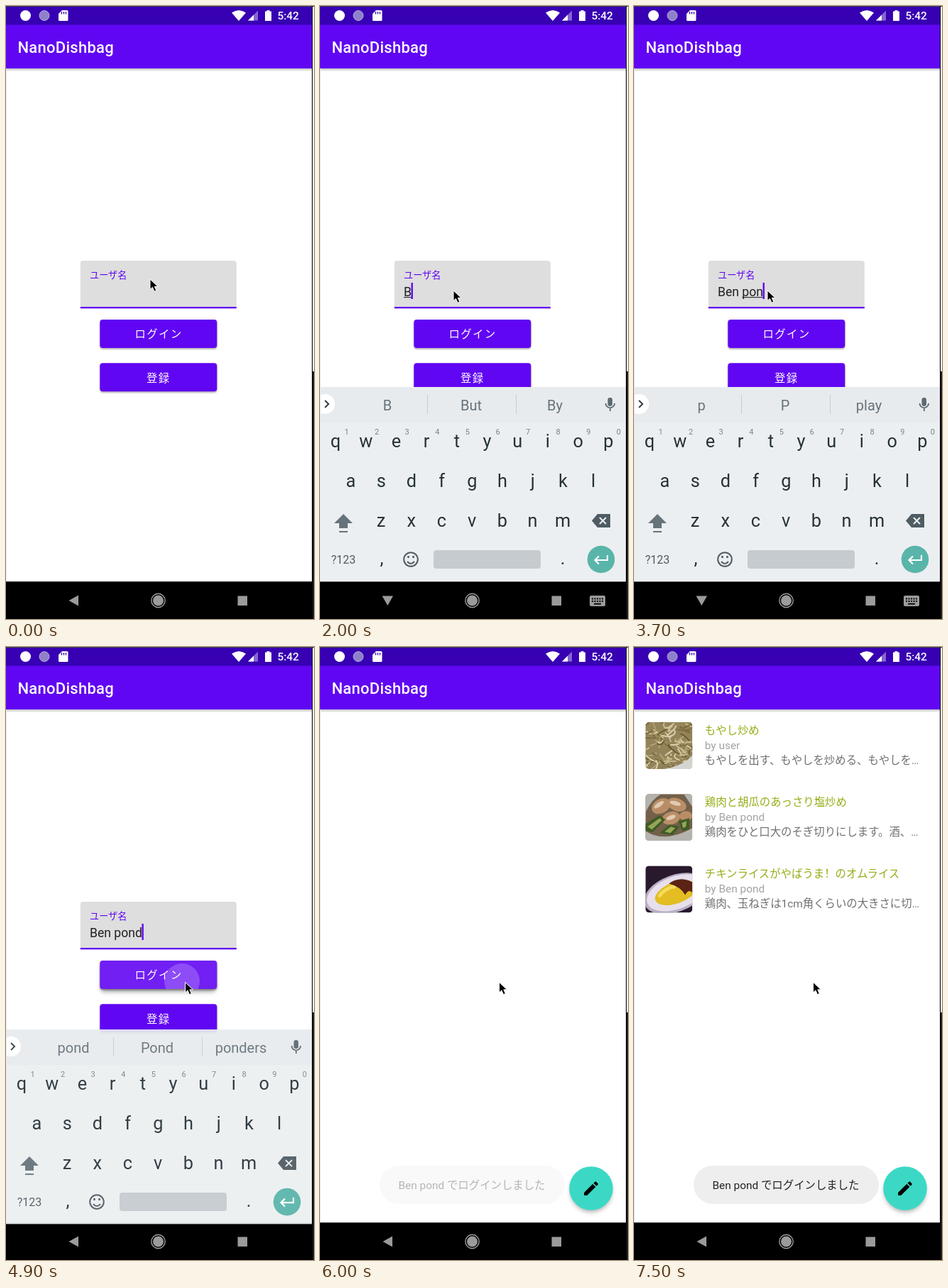
These frames come from a looping animation (434x864 px, 7600 ms). An HTML page:

```html
<!DOCTYPE html>
<html lang="ja">
<head>
<meta charset="utf-8">
<title>Login demo</title>
<style>
html, body { margin: 0; width: 100%; height: 100%; overflow: hidden; background: #fff; }
svg { display: block; width: 434px; height: 864px; font-family: Roboto, 'Noto Sans CJK SC', 'Noto Sans CJK JP', sans-serif; }
text { white-space: pre; }
.mid { text-anchor: middle; }
.btn { font-size: 15.4px; letter-spacing: 1.37px; fill: #fff; }
.row { font-size: 15.4px; }
.key { font-size: 25.3px; fill: #263238; text-anchor: middle; }
.num { font-size: 11px; fill: #78838a; text-anchor: middle; }
.sug { font-size: 20px; fill: #66737a; text-anchor: middle; }
</style>
</head>
<body>
<svg viewBox="0 0 434 864" lang="zh-Hans">
  <defs>
    <filter id="soft" x="-30%" y="-30%" width="160%" height="180%"><feGaussianBlur stdDeviation="1"/></filter>
    <filter id="wide" x="-30%" y="-40%" width="160%" height="200%"><feGaussianBlur stdDeviation="3"/></filter>
    <linearGradient id="fall" x2="0" y2="1">
      <stop stop-color="#000" stop-opacity=".24"/><stop offset="1" stop-color="#000" stop-opacity="0"/>
    </linearGradient>
    <clipPath id="login"><rect x="132.300" y="442" width="165" height="40" rx="4"/></clipPath>
    <clipPath id="thumb"><rect width="66" height="66" rx="5"/></clipPath>
  </defs>
  <rect width="434" height="864" fill="#fff"/>

  <g id="form">
    <path d="M104.800 426V363a4 4 0 0 1 4-4H320.800a4 4 0 0 1 4 4V426Z" fill="#dedede"/>
    <rect x="104.800" y="424" width="220" height="2.300" fill="#6106f2"/>
    <text x="118" y="384.300" font-size="13.2" fill="#6106f2">ユーザ名</text>
    <text id="name" x="118" y="408.500" font-size="17.6" fill="#212121"></text>
    <rect id="under" x="118" y="410" height="1.200" fill="#333"/>
    <rect id="caret" y="390" width="2.400" height="23" fill="#6106f2"/>
    <rect id="lift" x="134" y="447" width="161" height="39" rx="4" fill="#000" opacity=".3" filter="url(#wide)"/>
    <g id="buttons"></g>
    <g id="ripple" clip-path="url(#login)" fill="#fff">
      <rect x="132" y="442" width="166" height="40" opacity=".1"/>
      <circle id="wave" cx="248" cy="471" opacity=".2"/>
    </g>
    <text class="btn" x="181.500" y="468">ログイン</text>
    <text class="btn" x="198" y="529.500">登録</text>
  </g>

  <g id="list">
    <g id="rows"></g>
    <g id="pics">
      <g transform="translate(16.200 106)" clip-path="url(#thumb)">
        <rect width="66" height="66" fill="#93835a"/>
        <g id="sprouts" fill="none" stroke-width="1.800"></g>
        <path d="M26 66Q52 62 66 47V66Z" fill="#d4d5d0"/>
        <path d="M18 63Q48 60 66 44" fill="none" stroke="#8f8057" stroke-width="3"/>
      </g>
      <g transform="translate(16.200 207.200)" clip-path="url(#thumb)">
        <rect width="66" height="66" fill="#72604a"/>
        <path d="M0 0H22Q8 8 0 26ZM54 0H66V18ZM0 52Q26 70 66 48V66H0Z" fill="#b4b3ae"/>
        <g fill="#b98e67">
          <ellipse cx="22" cy="17" rx="14" ry="10" transform="rotate(-30 22 17)"/>
          <ellipse cx="44" cy="15" rx="14" ry="9" transform="rotate(20 44 15)"/>
          <ellipse cx="36" cy="34" rx="13" ry="9" transform="rotate(-15 36 34)"/>
          <ellipse cx="57" cy="31" rx="9" ry="7"/>
        </g>
        <g fill="#e0cbb2">
          <ellipse cx="19" cy="15" rx="8" ry="3" transform="rotate(-35 19 15)"/>
          <ellipse cx="42" cy="13" rx="8" ry="3" transform="rotate(15 42 13)"/>
          <ellipse cx="36" cy="33" rx="7" ry="3" transform="rotate(-20 36 33)"/>
        </g>
        <path d="M0 42L20 30 28 36 10 54 0 52ZM20 55L34 43 48 46 38 58ZM46 38L62 34 62 50 52 52Z" fill="#3f5b25"/>
        <path d="M3 46L20 34 23 37 9 50ZM27 53L36 46 42 48 35 55ZM51 41L58 38 57 46 53 48Z" fill="#94a758"/>
      </g>
      <g transform="translate(16.200 308.400)" clip-path="url(#thumb)">
        <rect width="66" height="66" fill="#28192d"/>
        <ellipse cx="42" cy="39" rx="46" ry="26" transform="rotate(-20 42 39)" fill="#b9adc5"/>
        <ellipse cx="43" cy="38" rx="43" ry="23" transform="rotate(-20 43 38)" fill="#e7e0ec"/>
        <ellipse cx="43" cy="38" rx="31" ry="15" transform="rotate(-20 43 38)" fill="#e3bd22"/>
        <path d="M20 42Q27 32 41 29" fill="none" stroke="#f4dc5a" stroke-width="5" stroke-linecap="round"/>
        <path d="M33 25Q48 14 66 23V38Q61 32 56 41 49 29 33 25Z" fill="#5a2315"/>
      </g>
    </g>
    <circle cx="382" cy="767" r="29.500" fill="#000" opacity=".3" filter="url(#wide)"/>
    <circle cx="382" cy="763" r="30.800" fill="#3bd9c5"/>
    <path transform="translate(368.800 750) scale(1.1)" d="M3 17.200V21H6.800L17.800 9.900 14.100 6.200ZM20.700 7Q21.300 6.300 20.700 5.600L18.400 3.300Q17.700 2.700 17 3.300L15.100 5.100 18.900 8.900Z"/>
    <g id="toast">
      <rect x="84" y="731" width="261" height="54" rx="27" fill="#eee"/>
      <text class="row mid" x="214" y="764" fill="#222">Ben pond でログインしました</text>
    </g>
  </g>

  <rect y="88" width="432" height="4.500" fill="url(#fall)"/>
  <rect y="26" width="432" height="62" fill="#6106f2"/>
  <rect width="432" height="26.500" fill="#3700b3"/>
  <text x="16.400" y="66" font-size="22" font-weight="500" letter-spacing=".27" fill="#fff">NanoDishbag</text>
  <g fill="#fff">
    <circle cx="27.500" cy="13.500" r="7.500"/>
    <circle cx="54" cy="13.500" r="7" fill="#8f80c9" stroke="#b5a9dd"/>
    <path d="M79 6H86a1.500 1.500 0 0 1 1.500 1.500V19.500a1.500 1.500 0 0 1-1.500 1.500H75.500a1.500 1.500 0 0 1-1.500-1.500V11Z"/>
    <path d="M78.500 8v3.500M81.500 8v3.500M84.500 8v3.500" stroke="#3700b3" stroke-width="1.300"/>
    <path d="M318 9.500Q328 2.500 338 9.500L328 21Z"/>
    <path d="M341 20.500L355 6.500V20.500Z" opacity=".4"/>
    <path d="M341 20.500L349 12.500V20.500Z"/>
    <path d="M365 7.500H367.500V6H371.500V7.500H374V21H365Z"/>
    <text x="382.500" y="19.300" font-size="15.4" font-weight="500">5:42</text>
  </g>

  <rect y="811.200" width="432" height="53"/>
  <g id="board">
    <rect y="537" width="432" height="274.200" fill="#eceff1"/>
    <rect y="537" width="432" height="50" fill="#e8ebee"/>
    <circle cx="7" cy="561" r="14" fill="#fff"/>
    <path d="M7 556L12 561 7 566" fill="none" stroke="#333e44" stroke-width="2"/>
    <path d="M151.500 548V575M276.500 548V575" stroke="#c7ccd0"/>
    <g id="sugs"></g>
    <rect x="405.500" y="552" width="6.500" height="12" rx="3.200" fill="#5c6a71"/>
    <path d="M402.500 560a6.300 6.300 0 0 0 12.600 0M408.800 566.500V571" fill="none" stroke="#5c6a71" stroke-width="1.800"/>
    <g id="keys"></g>
    <path d="M33 716L46 729H39V736H27V729H20Z" fill="#66737a"/>
    <path d="M27 741H39" stroke="#66737a" stroke-width="2"/>
    <path d="M391 716H409V735H391L383 725.500Z" fill="#4f5c63"/>
    <path d="M394 721L403 730M403 721L394 730" stroke="#eceff1" stroke-width="2"/>
    <text class="mid" x="33" y="786" font-size="16" fill="#4f5c63">?123</text>
    <g fill="none" stroke="#4f5c63" stroke-width="2">
      <circle cx="128" cy="780" r="9.800"/>
      <path d="M123 783Q128 789 133 783"/>
      <path d="M124.500 775V778M131.500 775V778" stroke-width="2.500"/>
    </g>
    <rect x="160" y="767" width="151" height="26" rx="4" fill="#c6cbd0"/>
    <circle cx="396" cy="780" r="19.300" fill="#59b5aa"/>
    <path d="M405 774V781H388M393 775.500L387.500 781 393 786.500" fill="none" stroke="#fff" stroke-width="2.200"/>
  </g>
  <g fill="#9b9b9b">
    <path id="back" d="M88.500 838L102 830.500V845.500Z"/>
    <path id="down" d="M87.500 831.500H103L95.300 845Z"/>
    <circle cx="214.500" cy="838" r="7.500"/>
    <circle cx="214.500" cy="838" r="9.700" fill="none" stroke="#9b9b9b" stroke-width="1.400"/>
    <rect x="326.500" y="831.500" width="13.500" height="13.500"/>
    <g id="ime">
      <rect x="380" y="831" width="22" height="15" rx="2"/>
      <path d="M383 835.500H399M383 839H399" stroke="#000" stroke-width="1.800" stroke-dasharray="2 1.500"/>
      <path d="M386 842.700H396" stroke="#000" stroke-width="1.800"/>
    </g>
  </g>
  <path d="M0 .5H434" stroke="#444"/>
  <path d="M.5 88V811" stroke="#ececec"/>
  <rect x="431" width="1.300" height="864"/>
  <rect x="432.300" y="1" width="2" height="514" fill="#fff"/>
  <rect x="432" y="515" width="2" height="349" fill="#1c1c1c"/>
  <path id="mouse" d="M0 0V14.500L3.400 11.400 6 17.300 8.800 16 6.300 10.400H11Z" stroke="#fff" stroke-width="1"/>
</svg>
<script>
const LOOP = 7600, STEP = 100;
const $ = id => document.getElementById(id);
const clamp = v => Math.max(0, Math.min(1, v));
const ease = v => v * v * (3 - 2 * v);
const show = (id, on) => { $(id).style.display = on ? '' : 'none'; };

function add(parent, tag, attrs, content = '') {
  const el = document.createElementNS('http://www.w3.org/2000/svg', tag);
  for (const k in attrs) el.setAttribute(k, attrs[k]);
  el.textContent = content;
  $(parent).append(el);
  return el;
}

const typed = [
  [0, ''], [1900, 'B'], [2100, 'Be'], [2300, 'Ben'], [2700, 'Ben '],
  [3200, 'Ben p'], [3700, 'Ben pon'], [3800, 'Ben pond']
];
const hints = [
  [0, ['', '', '']], [1900, ['B', 'But', 'By']], [2100, ['Be', 'Bed', 'Best']],
  [2300, ['Ben', 'Bend', 'Bean']], [2700, ['is', 'and', 'was']],
  [3200, ['p', 'P', 'play']], [4000, ['pond', 'Pond', 'ponders']]
];
const path = [[0, 203, 385], [200, 203, 385], [900, 188, 401], [4200, 188, 401], [4600, 252.5, 472.5], [LOOP, 252.5, 472.5]];
const at = (steps, t) => steps.filter(s => s[0] <= t).pop();

// Static parts
for (const y of [442, 503.2]) {
  const box = { x: 132.3, width: 165, height: 40, rx: 4 };
  add('buttons', 'rect', { ...box, y: y + 1.8, opacity: .32, filter: 'url(#soft)' });
  add('buttons', 'rect', { ...box, y, fill: '#6106f2' });
}

const recipes = [
  ['もやし炒め', 'user', 'もやしを出す、もやしを炒める、もやしを…'],
  ['鶏肉と胡瓜のあっさり塩炒め', 'Ben pond', '鶏肉をひと口大のそぎ切りにします。酒、…'],
  ['チキンライスがやばうま！のオムライス', 'Ben pond', '鶏肉、玉ねぎは1cm角くらいの大きさに切…']
];
recipes.forEach(([title, who, text], i) => {
  [[title, '#94ae17'], ['by ' + who, '#a2a2a2'], [text, '#707070']].forEach(([s, fill], j) =>
    add('rows', 'text', { class: 'row', x: 99.8, y: 122.5 + 101.2 * i + 21.2 * j, fill }, s));
});

let seed = 7;
const rnd = n => (seed = seed * 16807 % 2147483647) / 2147483647 * n;
const tones = ['#cdbf92', '#b5a472', '#7d6b3e', '#ddd2ad', '#9c8b58', '#675a32'];
for (let i = 0; i < 110; i++) {
  const x = rnd(76) - 5, y = rnd(66) - 5;
  add('sprouts', 'path', {
    d: `M${x} ${y}q${rnd(14) - 7} ${rnd(8)} ${rnd(36) - 18} ${rnd(20) - 4}`,
    stroke: tones[i % tones.length]
  });
}

const letters = [];
const key = (x, y, s) => add('keys', 'text', { class: 'key', x, y }, s);
[['qwertyuiop', 22, 622], ['asdfghjkl', 43.5, 678], ['zxcvbnm', 86, 734]].forEach(([row, x, y]) =>
  [...row].forEach((c, i) => letters.push([key(x + 42.7 * i, y, c), c])));
for (let i = 0; i < 10; i++) add('keys', 'text', { class: 'num', x: 37.5 + 42.6 * i, y: 604 }, (i + 1) % 10);
key(87, 787, ',');
key(342, 787, '.');
const sugs = [95, 213, 331].map(x => add('sugs', 'text', { class: 'sug', x, y: 569.5 }));

function moveMouse(t) {
  const i = Math.max(1, path.findIndex(p => p[0] > t));
  const [a, b] = [path[i - 1], path[i]];
  const p = ease(clamp((t - a[0]) / (b[0] - a[0])));
  const mix = k => a[k] + (b[k] - a[k]) * p;
  $('mouse').setAttribute('transform', `translate(${mix(1)} ${mix(2)})`);
}

function drawField(t) {
  const [since, text] = at(typed, t);
  $('name').textContent = text;
  const width = text ? $('name').getComputedTextLength() : 0;
  $('caret').setAttribute('x', 117.5 + width);
  const blink = t < 1300 ? 500 : Math.max(1300, since);
  show('caret', t >= 500 && (t - blink) % 1000 < 500);

  const word = text.lastIndexOf(' ') + 1;
  const start = word ? $('name').getSubStringLength(0, word) : 0;
  show('under', word < text.length && t < 4850);
  $('under').setAttribute('x', 118 + start);
  $('under').setAttribute('width', width - start);
}

function drawBoard(t) {
  const open = 1 - (1 - clamp((t - 1460) / 150)) ** 3;
  const shut = clamp((t - 4862) / 150) ** 2;
  const shown = t < 4862 ? open : 1 - shut;
  show('board', shown > 0);
  $('board').setAttribute('transform', `translate(0 ${33 * (1 - shown)})`);
  $('board').setAttribute('opacity', shown);
  const up = t >= 1460 && t < 4862;
  show('back', !up);
  show('down', up);
  show('ime', up);
  at(hints, t)[1].forEach((s, i) => { sugs[i].textContent = s; });
  for (const [el, c] of letters) el.textContent = t < 1900 ? c.toUpperCase() : c;
}

function drawRipple(t) {
  const fade = t < 4800 ? 0 : 1 - clamp((t - 5000) / 350);
  $('ripple').setAttribute('opacity', fade);
  $('lift').setAttribute('opacity', .35 * fade);
  $('wave').setAttribute('r', Math.max(12, 25 + (t - 4900) * .5));
}

function draw(t) {
  moveMouse(t);
  const listed = t >= 5900;
  show('form', !listed);
  show('list', listed);
  drawBoard(t);
  if (listed) {
    show('rows', t >= 6200);
    show('pics', t >= 6400);
    $('toast').setAttribute('opacity', clamp((t - 5900) / 300));
  } else {
    drawField(t);
    drawRipple(t);
  }
}

const begin = performance.now();
function tick() {
  const t = (performance.now() - begin) % LOOP;
  draw(Math.floor(t / STEP) * STEP);
  requestAnimationFrame(tick);
}
tick();
</script>
</body>
</html>
```
